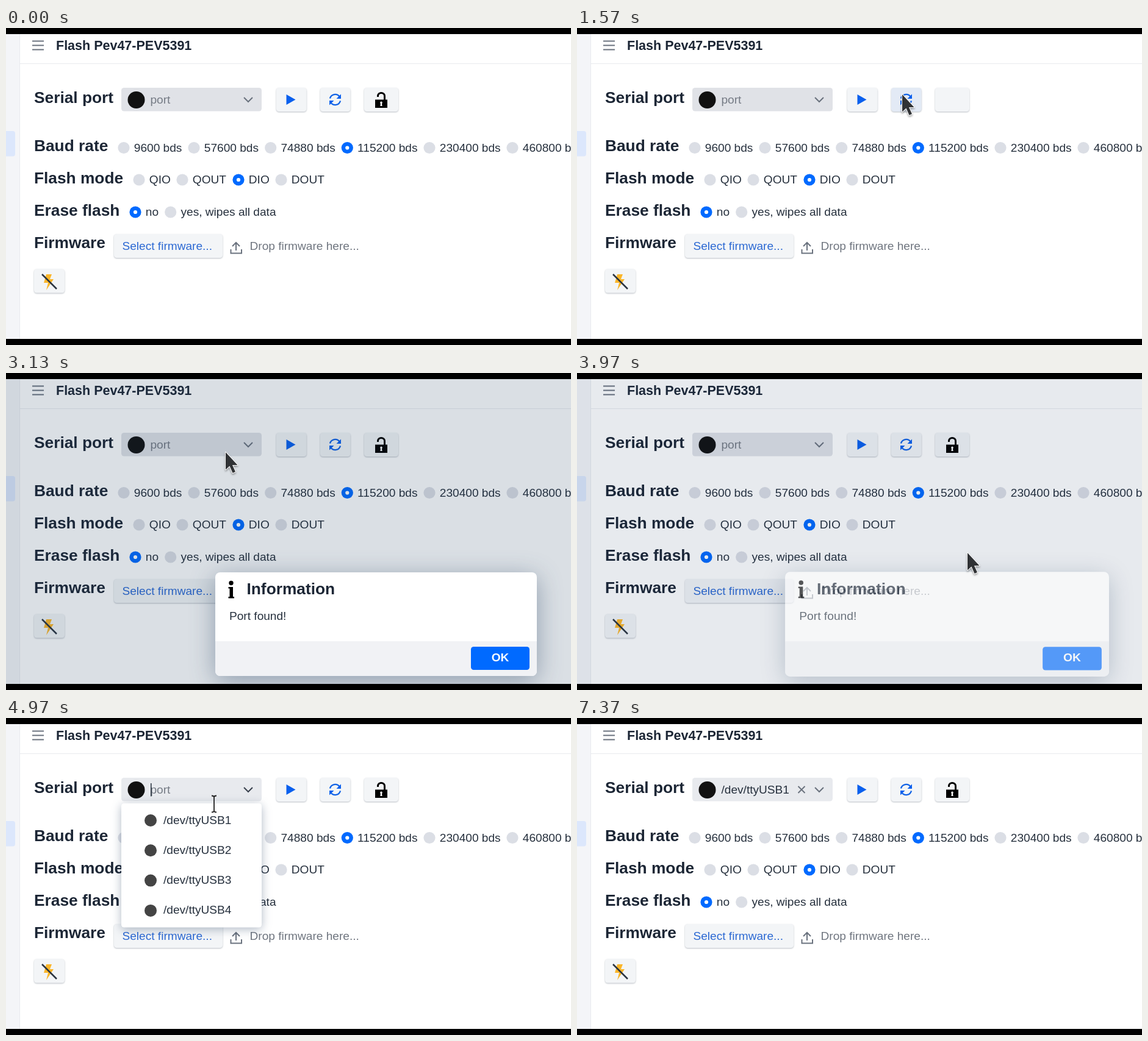
An HTML page for the animation above (7900 ms loop, 926 by 520 pixels).

```html
<!DOCTYPE html>
<html lang="en">
<head>
<meta charset="utf-8">
<title>Firmware flasher</title>
<style>
  html, body { margin: 0; height: 100%; overflow: hidden; background: #fff; }
  svg { display: block; width: 100vw; height: 100vh; font: 19.1px "Liberation Sans", Arial, sans-serif; fill: #26303d; }
  .h { font-size: 26.3px; font-weight: bold; fill: #1c2635; }
  .title { font-size: 21.5px; font-weight: bold; fill: #1c2635; }
  .soft { fill: #6f757f; }
  .line { fill: none; stroke: #6a727e; stroke-width: 2; }
  .btn { fill: #f3f5f7; filter: drop-shadow(0 1px 1px rgba(20, 35, 60, .3)); }
  .blue { fill: #0a60ee; }
  .panel { fill: #fff; filter: drop-shadow(0 3px 8px rgba(28, 55, 90, .35)); }
  #dialog { transform-origin: 606px 412px; }
  #dialog .panel { filter: drop-shadow(0 8px 20px rgba(28, 55, 90, .4)); }
  #arrow path { fill: #303235; stroke: #fff; stroke-width: 2; stroke-linejoin: round; paint-order: stroke;
    filter: drop-shadow(0 2px 1.5px rgba(0, 0, 0, .35)); }
</style>
</head>
<body>
<svg viewBox="0 0 926 520">
  <rect width="926" height="520" fill="#fff"/>
  <rect width="22" height="520" fill="#f4f5f8"/>
  <path d="M22.5 0V520M22 58.5H926" stroke="#e8eaee"/>
  <rect x="-8" y="169" width="23" height="41.5" rx="4" fill="#dce7fc"/>
  <path class="line" d="M43 21.5H62M43 28.5H62M43 35.5H62"/>
  <text class="title" x="82" y="36">Flash Pev47-PEV5391</text>
  <text class="h" x="46" y="123">Serial port</text>
  <text class="h" x="46" y="202">Baud rate</text>
  <text class="h" x="46" y="255">Flash mode</text>
  <text class="h" x="46" y="308">Erase flash</text>
  <text class="h" x="46" y="361">Firmware</text>

  <rect id="field" x="189" y="98" width="230" height="38.5" rx="4.5"/>
  <circle cx="213.5" cy="118" r="14" fill="#111"/>
  <text id="value" x="236.5" y="124"></text>
  <path id="clear" class="line" d="M362.5 112 373.500 123M373.500 112 362.500 123"/>
  <path id="chevron" class="line" d="M390 114 397 121 404 114"/>
  <rect id="caret" y="107" width="1.5" height="21.500"/>

  <g id="buttons"></g>
  <path class="blue" d="M459.500 109V126L474.500 117.500Z"/>
  <g fill="none" stroke="#1263e6" stroke-width="2.3">
    <path d="M531 115.500A8.700 8.700 0 0 1 546.500 112.500M548 119.500A8.700 8.700 0 0 1 532.500 122.500"/>
    <path class="blue" stroke="none" d="M549 108.500V116H541.500ZM530 126.500V119H537.500Z"/>
  </g>
  <g id="lock">
    <path d="M609.500 113V111.500A5.500 5 0 0 1 620.500 111.500V119" fill="none" stroke="#000" stroke-width="3"/>
    <rect x="605" y="117.500" width="20" height="13.500" fill="#000"/>
    <path d="M615 120.500a2 2 0 0 1 1 3.600l.6 4h-3.200l.6-4a2 2 0 0 1 1-3.600" fill="#fff"/>
  </g>
  <text x="190.500" y="363.500" fill="#2c69d3">Select firmware...</text>
  <path class="line" d="M377 365V352M371 358 377 352 383 358M368.500 363V369.500H386V363"/>
  <text class="soft" x="399.500" y="363.500">Drop firmware here...</text>
  <path d="M66 404H75L72 412H78L66 430 69 418H62Z" fill="#fbb62a"/>
  <path d="M59 404 83 428" stroke="#2b3441" stroke-width="2.500"/>
  <g id="radios"></g>

  <g id="menu">
    <rect class="panel" x="189" y="140" width="230" height="203.500" rx="4.500"/>
    <rect id="hover" x="194" y="145" width="220" height="45" rx="4.500" fill="#e8f0fd"/>
  </g>

  <rect id="shade" width="926" height="520" fill="#1c375a"/>
  <g id="dialog">
    <rect class="panel" x="343" y="327" width="527" height="170" rx="8"/>
    <path d="M343 440H870V489a8 8 0 0 1-8 8H351a8 8 0 0 1-8-8Z" fill="#f1f2f5"/>
    <g fill="#000">
      <circle cx="369" cy="344.500" r="3.700"/>
      <path d="M364.500 351H372V367H374V369.500H364.500V367H366.500V353.500H364.500Z"/>
    </g>
    <text class="h" x="394.500" y="363">Information</text>
    <text x="366" y="405">Port found!</text>
    <rect x="762" y="449" width="96" height="38" rx="4.500" fill="#006aff"/>
    <text x="810" y="473" text-anchor="middle" font-weight="bold" style="fill:#fff">OK</text>
  </g>

  <g id="pointer">
    <g id="arrow"><path d="M1 1V29.500L7.500 23.500 12.500 35 17 33 12 22H20.500Z"/></g>
    <path id="beam" d="M-4-13.500Q0-13.500 0-11Q0-13.500 4-13.500M0-11V11M-4 13.500Q0 13.500 0 11Q0 13.500 4 13.500"
      fill="none" stroke="#222" stroke-width="1.800"/>
  </g>
  <path d="M0 0H926V10H0ZM0 510H926V520H0Z" fill="#000"/>
</svg>
<script>
const LOOP = 7900;
const $ = id => document.getElementById(id);
const add = (id, markup) => $(id).insertAdjacentHTML('beforeend', markup);
const show = (id, on) => $(id).setAttribute('visibility', on ? 'visible' : 'hidden');
const within = (t, a, b) => t >= a && t < b;
const clamp = p => Math.min(1, Math.max(0, p));
const smooth = p => p * p * (3 - 2 * p);

// x, y, width of each button
[[443, 98, 49.5], [515, 98, 49.5], [587, 98, 56], [177, 338, 178], [46, 395.5, 50]].forEach(([x, y, w]) =>
  add('buttons', `<rect class="btn" x="${x}" y="${y}" width="${w}" height="39" rx="4.5"/>`));
const refresh = $('buttons').children[1];

function radioRow(cy, baseline, picked, options) {
  options.forEach(([cx, label], i) => add('radios',
    `<circle cx="${cx}" cy="${cy}" r="9.6" fill="${i === picked ? '#006aff' : '#dbdee5'}"/>` +
    (i === picked ? `<circle cx="${cx}" cy="${cy}" r="3.1" fill="#fff"/>` : '') +
    `<text x="${cx + 16.8}" y="${baseline}">${label}</text>`));
}
radioRow(196.5, 202.5, 3, [[193, '9600 bds'], [308, '57600 bds'], [433.7, '74880 bds'],
  [559.3, '115200 bds'], [694, '230400 bds'], [830, '460800 bds']]);
radioRow(249, 255, 2, [[218, 'QIO'], [289, 'QOUT'], [381, 'DIO'], [451, 'DOUT']]);
radioRow(302, 308, 0, [[212, 'no'], [269.7, 'yes, wipes all data']]);

for (let i = 0; i < 4; i++) {
  const y = 168 + i * 49.3;
  add('menu', `<circle cx="237" cy="${y}" r="10" fill="#444"/><text x="258" y="${y + 5.5}">/dev/ttyUSB${i + 1}</text>`);
}

// Pointer stops: time, x, y
const path = [[270, 885, 105], [330, 861, 124], [530, 861, 124], [1130, 532, 108], [2570, 532, 108],
  [3030, 359, 129], [3200, 359, 129], [3830, 639, 294], [4150, 639, 294], [4650, 341, 141],
  [4970, 341, 141], [5330, 324, 162], [LOOP, 324, 162]];

function pointerAt(t) {
  const i = Math.max(1, path.findIndex(k => k[0] > t));
  const [t0, x0, y0] = path[i - 1], [t1, x1, y1] = path[i];
  const p = smooth(clamp((t - t0) / (t1 - t0)));
  return [x0 + (x1 - x0) * p, y0 + (y1 - y0) * p];
}

function draw(t) {
  const opened = t >= 4730, chosen = t >= 5500;
  const menu = opened && !chosen;

  const [x, y] = pointerAt(t);
  const beam = within(t, 4610, 5050);
  $('pointer').setAttribute('transform', `translate(${x} ${y})`);
  show('arrow', within(t, 270, 6750) && !beam);
  show('beam', beam);
  refresh.style.fill = within(t, 1090, 2610) ? '#e3eaf5' : '';
  show('lock', !within(t, 1430, 1630));

  $('field').style.fill = opened ? '#e8eaee' : '#e0e2e7';
  $('value').textContent = chosen ? '/dev/ttyUSB1' : 'port';
  $('value').style.fill = chosen ? '' : '#757b85';
  $('chevron').style.stroke = menu ? '#3a424e' : '';
  show('clear', chosen);
  show('caret', within(t, 4730, 5330) || within(t, 5530, 6130) || within(t, 6730, 7370));
  $('caret').setAttribute('x', chosen ? 348.5 : 237);
  show('menu', menu);
  show('hover', menu && t >= 5100);

  const enter = 1 - (1 - clamp((t - 1580) / 250)) ** 3;
  const leave = clamp((t - 3890) / 220);
  const alpha = enter * (1 - leave);
  $('shade').style.opacity = .16 * alpha;
  $('dialog').style.opacity = alpha;
  $('dialog').style.transform = `scale(${.95 + .05 * enter + .02 * leave})`;
}

const start = performance.now();
function frame() {
  draw((performance.now() - start) % LOOP);
  requestAnimationFrame(frame);
}
frame();
</script>
</body>
</html>
```
